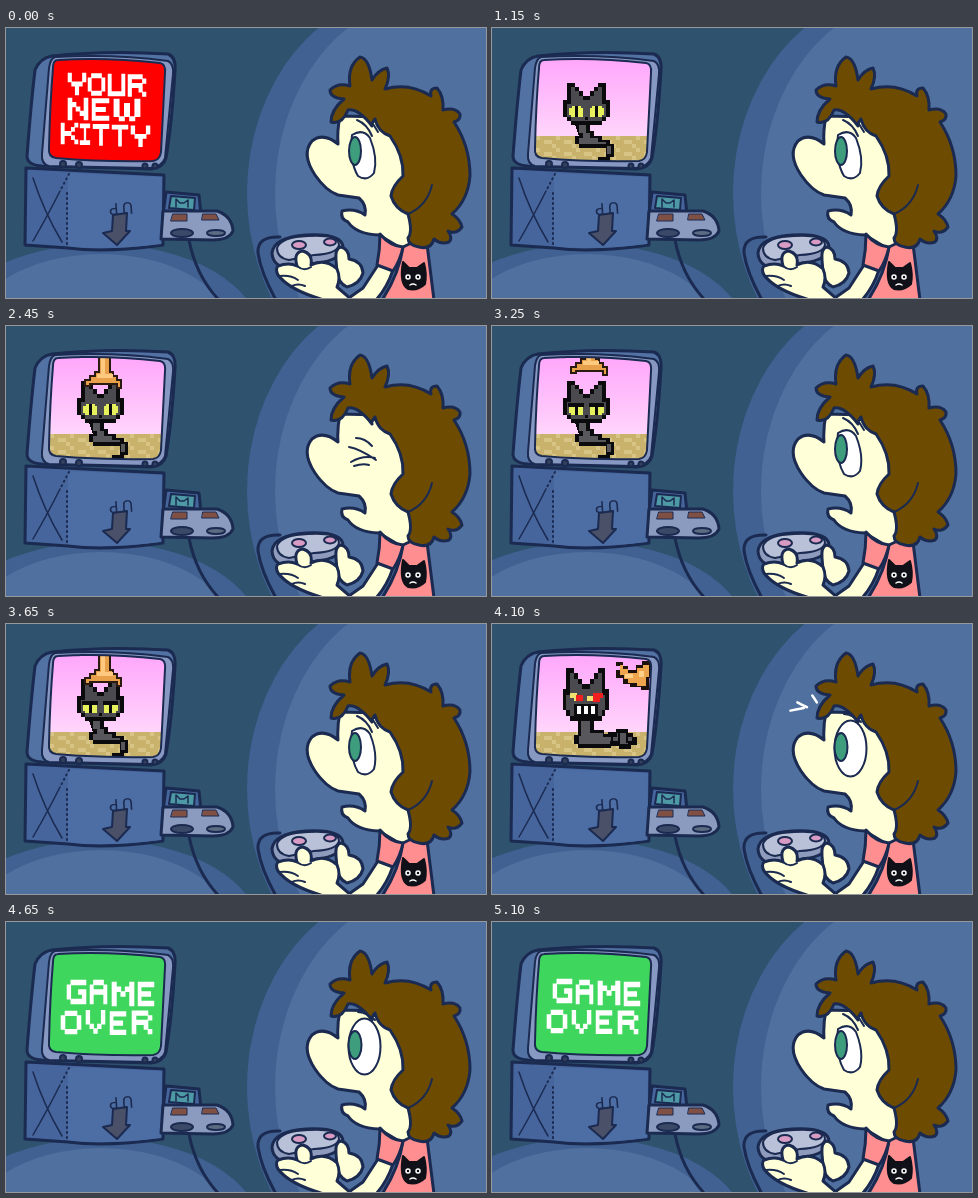
Recreate the animation shown at these times as an HTML page. Size 480 by 270 pixels, loop 5.6 s.

```html
<!DOCTYPE html>
<html lang="en">
<head>
<meta charset="utf-8">
<title>Your new kitty</title>
<style>
  html, body { margin: 0; width: 100%; height: 100%; overflow: hidden; background: #2f526f; }
  svg { display: block; width: 100vw; height: 100vh; }
  .ink { stroke: #1b2a50; stroke-width: 3; stroke-linejoin: round; stroke-linecap: round; }
  .thin { stroke-width: 2; }
  .line { fill: none; }
  .pixel { shape-rendering: crispEdges; }
  .letters { fill: none; stroke: #fff; stroke-width: 1.15; stroke-linecap: square; }
  .letters.alt path:nth-child(odd) { translate: 0 1px; }
</style>
</head>
<body>
<svg viewBox="0 0 480 270" preserveAspectRatio="none">
  <defs>
    <clipPath id="glass"><path id="glassShape" d="M52 32Q100 29 154 35Q160 36 159 45L155 124Q154 132 147 133Q95 134 50 130Q42 129 43 120Q44 75 47 40Q47 32 52 32z"/></clipPath>
    <linearGradient id="sky" x2="0" y2="1"><stop stop-color="#ffa6fb"/><stop offset="1" stop-color="#ffd6fb"/></linearGradient>
    <pattern id="sand" width="20" height="12" patternUnits="userSpaceOnUse">
      <path fill="#c8b26c" d="M0 0h20v12H0z"/><path fill="#d8c585" d="M4 0h4v4H4zM12 4h8v4h-8zM0 8h4v4H0z"/>
    </pattern>
    <g id="head">
      <path fill="#0b0b0d" d="M1 0h2v1h1v1h1v1h2v-1h1v-1h1v-1h2v4h1v4h-1v1h-1v1h-8v-1h-1v-1h-1v-4h1z"/>
      <path fill="#4b4a4e" d="M2 1h1v1h1v1h1v1h2v-1h1v-1h1v-1h1v4h1v3h-1v1H2v-1H1v-3h1z"/>
    </g>
  </defs>

  <!-- room -->
  <path fill="#2f526f" d="M0 0h480v270H0z"/>
  <ellipse cx="95" cy="310" rx="160" ry="94" fill="#416192"/>
  <ellipse cx="95" cy="312" rx="136" ry="86" fill="#5070a0"/>
  <ellipse cx="405" cy="165" rx="164" ry="200" fill="#416192"/>
  <ellipse cx="425" cy="165" rx="156" ry="195" fill="#5070a0"/>

  <!-- box -->
  <g class="ink">
    <path fill="#45659c" d="M20 140L158 147L157 217Q100 225 62 220L19 217z"/>
    <path fill="#4d6ea4" stroke="none" d="M62 145L156 149L155 216Q100 223 62 218z"/>
    <path class="line" style="stroke-width:1.5" d="M27 150Q38 184 56 214M27 213Q42 187 54 163"/>
    <path class="line thin" stroke-dasharray="1 4" d="M63 146L54 163M61 165V216"/>
    <path class="thin" fill="#4a5068" d="M107 187L121 185L120 203L124 203L111 217L97 205L106 203z"/>
  </g>
  <text transform="translate(127 174) rotate(176)" font-family="DejaVu Sans, sans-serif" font-size="16" letter-spacing="3" fill="#1b2a50">UP</text>

  <!-- console -->
  <g class="ink">
    <path class="line" d="M183 212Q190 248 213 272"/>
    <path fill="#46659c" d="M160 164L193 167L195 187H157z"/>
    <path class="thin" fill="#4d9aa6" d="M165 168L189 170L188 182L163 180z"/>
    <path class="line" style="stroke-width:1.5" d="M170 179V171l4 4h4l4-3v7"/>
    <path fill="#8b9abf" d="M157 183H211Q226 188 227 203Q223 212 207 212L155 211z"/>
    <g class="thin">
      <path fill="#805044" style="stroke-width:1" d="M167 186h14v7h-16zM197 186h13l3 6h-17z"/>
      <ellipse cx="176" cy="205" rx="11" ry="4" fill="#394967"/>
      <ellipse cx="210" cy="205" rx="9" ry="3" fill="#5b6b82"/>
    </g>
  </g>

  <!-- television -->
  <g class="ink">
    <path fill="#5272a4" d="M46 28Q100 22 162 26Q170 29 169 42Q166 95 160 130Q157 140 145 141L36 138Q21 137 21 128Q25 76 29 42Q34 30 46 28z"/>
    <path class="thin" fill="#8799c2" d="M49 29Q110 26 162 33Q168 36 167 46L159 130Q156 139 143 140L43 138Q35 136 36 126L43 40Q44 31 49 29z"/>
    <g fill="#34405c" class="thin"><circle cx="57" cy="136" r="3"/><circle cx="73" cy="137" r="3"/><circle cx="139" cy="138" r="2.500"/><circle cx="149" cy="138" r="2.500"/></g>
  </g>

  <g clip-path="url(#glass)">
    <path id="plain" d="M40 30h122v105H40z"/>
    <g id="title" class="letters"></g>
    <g id="over" class="letters"></g>
    <g id="scene" class="pixel">
      <path fill="url(#sky)" d="M40 30h122v80H40z"/>
      <path fill="url(#sand)" d="M40 108h122v27H40z"/>
      <g id="cat" transform="translate(71 55) scale(3.9 4.2)">
        <path fill="#0b0b0d" d="M3 9.5h4v2h1v1h2v1h1v2H4v-1H3v-2h1z"/>
        <path id="tail" fill="#0b0b0d"/>
        <path fill="#58575b" d="M4 10h2v2h1v1h2v1h2v.5H4v-1.5h1v-1H4zM11.4 15h.8v2h-.8z"/>
        <use href="#head"/>
        <path fill="#e5f05c" d="M1.5 6h.7v-.6h2.3v.6h.6v2h-3v-.5h-.6zM6.8 6h.7v-.6h2.4v.6h.6v1.5h-.6v.5h-3.1z"/>
        <path fill="#0b0b0d" d="M3 5.4h.8v2.6H3zM8.2 5.4h.8v2.6h-.8zM5.6 8h.8v.7h-.8z"/>
        <path id="lids" fill="#0b0b0d" d="M1.3 5.2h4v1.1h-4zM6.6 5.2h4v1.1h-4z"/>
      </g>
      <g id="hand">
        <path fill="#e9a04a" stroke="#2a1a10" stroke-width="2" d="M93-20V46h-4v4h-5v4h-5v6h5v-2h27v4h4v-8h-4v-4h-4v-4h-3V-20z"/>
        <path fill="#ffc980" d="M95-20h4V48h8v4H91v-4h4z"/>
      </g>
      <g id="monster">
        <path fill="#0b0b0d" d="M86 94h16v12h10v4h4v-2h8v-3h12v4h5v4h4v8h-6v4h-12v-3h-8v2H86v-4h-4v-9h4z"/>
        <path fill="#58575b" d="M89 96h9v13h13v4h14v-4h10v4h5v4h-4v3h-8v-3h-10v3H87v-8h2z"/>
        <path fill="#0b0b0d" d="M119 109h2v9h-2zM126 107h2v12h-2zM134 107h2v12h-2z"/>
        <use href="#head" transform="translate(70.500 44) scale(3.900 5.300)"/>
        <path fill="#0b0b0d" d="M82 80h24v13H82z"/>
        <path fill="#f0e070" d="M78 69h7v8h-3v-3h-4zM95 72h7v5h-7z"/>
        <path fill="#f02020" d="M84 71h7v6h-7zM101 69h10v5h-3v4h-7z"/>
        <path fill="#fff" d="M85 82h4v8h-4zM92 82h4v8h-4zM99 82h4v8h-4z"/>
      </g>
      <g id="stump">
        <path fill="#1d120b" d="M124 38h7v4h5v4h8v-5h6v-4h9v17h-2v12h-8v-3h-11v-3h-7v-6h-7v-8h4v-4h-4z"/>
        <path fill="#eda64d" d="M128 41h3v4h5v4h9v-5h6v-3h6v12h-3v9h-9v-3h-9v-4h-4v-4h-4z"/>
        <path fill="#ffd08a" d="M133 50h8v4h-8zM147 47h5v6h-5z"/>
      </g>
    </g>
  </g>
  <use href="#glassShape" class="ink line thin"/>

  <!-- player -->
  <g class="ink">
    <path class="line" d="M274 209Q251 208 252 225Q255 245 270 272"/>
    <path fill="#8f9bbd" d="M266 225Q268 209 300 207Q336 205 337 219Q336 232 311 235L283 240Q267 239 266 225z"/>
    <path class="thin" fill="#b9c1d9" d="M271 220Q275 209 302 208Q333 206 333 217Q331 226 308 227L283 232Q271 230 271 220z"/>
    <g class="thin" fill="#d79bc4"><ellipse cx="293" cy="217" rx="7" ry="4"/><ellipse cx="324" cy="214" rx="6" ry="3.500"/></g>
    <path fill="#ffffd8" d="M334 88Q331 103 332 116Q317 104 306 113Q295 126 309 147Q320 163 332 167L353 170Q361 177 359 187Q349 180 336 183Q334 191 342 194Q350 206 373 207L398 222L421 212V90z"/>
    <path fill="#ffffd8" d="M340 272L357 260L372 237L387 242Q381 260 370 272z"/>
    <path fill="#ff8e90" d="M397 219Q393 246 376 272H428L420 208z"/>
    <path fill="#ff8e90" d="M374 206Q384 218 397 219Q394 233 387 243L371 237Q374 222 374 206z"/>
    <path fill="#ffffd8" d="M330 232Q329 220 335 219Q343 221 343 231Q356 233 357 245Q354 256 341 259Q332 255 331 244z"/>
    <path fill="#ffffd8" d="M272 238Q283 234 291 238Q287 224 297 223Q307 226 305 237Q319 230 331 241Q335 250 331 259L346 272H318Q283 262 272 247Q269 241 272 238z"/>
    <path class="line thin" d="M291 238Q298 244 305 239M274 248Q285 247 292 252M286 258Q292 255 299 258"/>
    <path class="thin" style="stroke:#101018" fill="#101018" d="M397 234L403 240H411L418 235Q421 246 419 256Q412 263 402 261Q393 256 397 234z"/>
    <g class="line" style="stroke:#fff;stroke-width:1.5"><circle cx="402" cy="249" r="2"/><circle cx="412" cy="249" r="2"/><path d="M404 257q3-2 6 0"/></g>
  </g>

  <g id="calm" class="ink thin">
    <path fill="#fff" d="M346 107Q357 100 364 110Q372 130 368 145Q361 154 352 148Q343 133 346 107z"/>
    <ellipse cx="349" cy="123" rx="6" ry="14" fill="#3e9d7c"/>
    <path class="line" d="M351 92Q361 96 366 108M367 96l5 8"/>
  </g>
  <g id="squint" class="ink thin line">
    <path d="M343 121Q354 123 370 134M345 136Q357 129 369 132M348 140Q357 137 363 139M350 112Q359 112 366 120"/>
  </g>
  <g id="wide" class="ink thin">
    <ellipse cx="358.500" cy="124.500" rx="16" ry="28" fill="#fff"/>
    <ellipse cx="349" cy="123" rx="6.500" ry="14" fill="#3e9d7c"/>
    <path class="line" d="M352 90Q362 91 369 98"/>
  </g>

  <path class="ink" fill="#6d4b00" d="M338 71Q324 70 324 62Q332 54 344 58Q341 38 354 29Q363 30 366 52Q372 42 381 40Q385 48 379 61Q403 54 425 68Q423 60 431 60Q438 68 437 82Q449 79 454 86Q455 92 448 94Q464 118 464 148Q462 172 446 186Q454 191 456 199Q450 207 442 203Q447 210 443 214Q435 217 428 211Q425 222 413 219Q402 217 402 210Q407 204 402 186Q389 181 385 168Q386 158 397 148Q398 128 384 108Q372 104 369 91Q365 96 366 98Q352 80 342 82Q336 97 325 94Q325 82 338 71z"/>
  <path class="ink thin line" d="M426 157Q421 178 402 186"/>
  <g id="sweat" fill="none" stroke="#fff" stroke-width="2.500" stroke-linecap="round">
    <path pathLength="100" d="M326 82Q308 84 279 91"/>
    <path pathLength="100" d="M326 88Q306 80 292 70"/>
    <path pathLength="100" d="M329 86Q323 74 313 62"/>
  </g>
</svg>

<script>
const LOOP = 5600, STEP = 50;
const get = id => document.getElementById(id);
const show = (id, on) => get(id).style.display = on ? "" : "none";
const clamp = v => Math.max(0, Math.min(1, v));

// Letter strokes on a five by five grid
const strokes = {
  A: "M0 4V1M4 4V1M1 0h2M0 2h4",
  E: "M4 0H0v4h4M0 2h3",
  G: "M4 0H1M0 1v2M1 4h3v-2h-1",
  I: "M0 0h4M2 0v4M0 4h4",
  K: "M0 0v4M1 2h1M3 1h.01M4 0h.01M3 3h.01M4 4h.01",
  M: "M0 4V0M4 4V0M1 1h.01M2 2h.01M3 1h.01",
  N: "M0 4V0M4 4V0M1 1h.01M2 2h.01M3 3h.01",
  O: "M1 0h2M0 1v2M4 1v2M1 4h2",
  R: "M0 4V0h3M4 1h.01M1 2h2M3 3h.01M4 4h.01",
  T: "M0 0h4M2 0v4",
  U: "M0 0v4h4v-4",
  V: "M0 0v2M4 0v2M1 3h.01M3 3h.01M2 4h.01",
  W: "M0 0v3M4 0v3M2 1v2M1 4h.01M3 4h.01",
  Y: "M0 0v1M4 0v1M1 2h2M2 2v2"
};

function write(id, word, y, height, slope, spans) {
  get(id).setAttribute("aria-label", (get(id).getAttribute("aria-label") || "") + word + " ");
  get(id).innerHTML += [...word].map((ch, i) => {
    const [x, w] = spans[i];
    return `<path d="${strokes[ch]}" transform="translate(${x} ${y + slope * i}) scale(${w / 5} ${height / 5}) translate(.5 .5)"/>`;
  }).join("");
}
write("title", "YOUR", 45, 22, 0.5, [[62, 18], [82, 17], [102, 17], [122, 18]]);
write("title", "NEW", 70, 22, 0.5, [[62, 20], [86, 17], [108, 26]]);
write("title", "KITTY", 95, 21, 0.7, [[55, 17], [74, 10], [87, 16], [106, 16], [125, 19]]);
write("over", "GAME", 57, 24, 1, [[61, 19], [84, 17], [106, 22], [132, 16]]);
write("over", "OVER", 88, 23, 0.3, [[55, 20], [80, 19], [104, 16], [126, 20]]);

const tails = [
  "M10 13.500h2v1h1v3h-1v1H9v-1h2v-2h-1z",
  "M10 13.500h2v1h1v2h-1v2h-2v-1h1v-2h-1z"
];

function draw(time) {
  const t = Math.floor((time % LOOP) / STEP) * STEP;
  const within = (from, to) => t >= from && t < to;

  const intro = t < 1150, outro = t >= 4650, attack = within(4000, 4650);
  get("plain").setAttribute("fill", outro ? "#3fd65d" : "#ff0000");
  show("title", intro);
  show("over", outro);
  show("scene", !intro && !outro);
  get("title").classList.toggle("alt", t >= 650);
  get("over").classList.toggle("alt", t < 4950);

  show("cat", !attack);
  show("lids", t >= 3250);
  const wagging = within(1600, 2150) || within(3250, 3650);
  get("tail").setAttribute("d", tails[wagging ? Math.floor((t - 1600) / 100) % 2 : 0]);
  show("monster", attack);
  show("stump", attack);
  const shake = Math.min(t, 4550) / STEP % 3 === 1 ? 0 : -4;
  get("monster").setAttribute("transform", `translate(${shake} 0)`);

  show("hand", within(1600, 4000));
  const lift = t < 2200 ? 34 * (1 - clamp((t - 1600) / 550))
    : t < 3250 ? 13 * clamp((t - 2750) / 200)
    : 13 * (1 - clamp((t - 3250) / 400));
  const rub = within(2200, 2700) ? 4 * Math.sin((t - 2200) / 125 * Math.PI) : 0;
  get("hand").setAttribute("transform", `translate(${Math.round(rub)} ${-Math.round(lift)})`);

  const squint = within(2250, 2700), wide = within(4000, 5050);
  show("squint", squint);
  show("wide", wide);
  show("calm", !squint && !wide);

  // Drops fly outward: the front of each streak outruns its end
  const front = 100 * clamp((t - 4000) / 170), end = 100 * clamp((t - 4000) / 330);
  show("sweat", within(4050, 4350));
  get("sweat").setAttribute("stroke-dasharray", `${Math.max(front - end, 1)} 300`);
  get("sweat").setAttribute("stroke-dashoffset", -end);
}

const start = performance.now();
(function tick() {
  draw(performance.now() - start);
  requestAnimationFrame(tick);
})();
</script>
</body>
</html>
```
